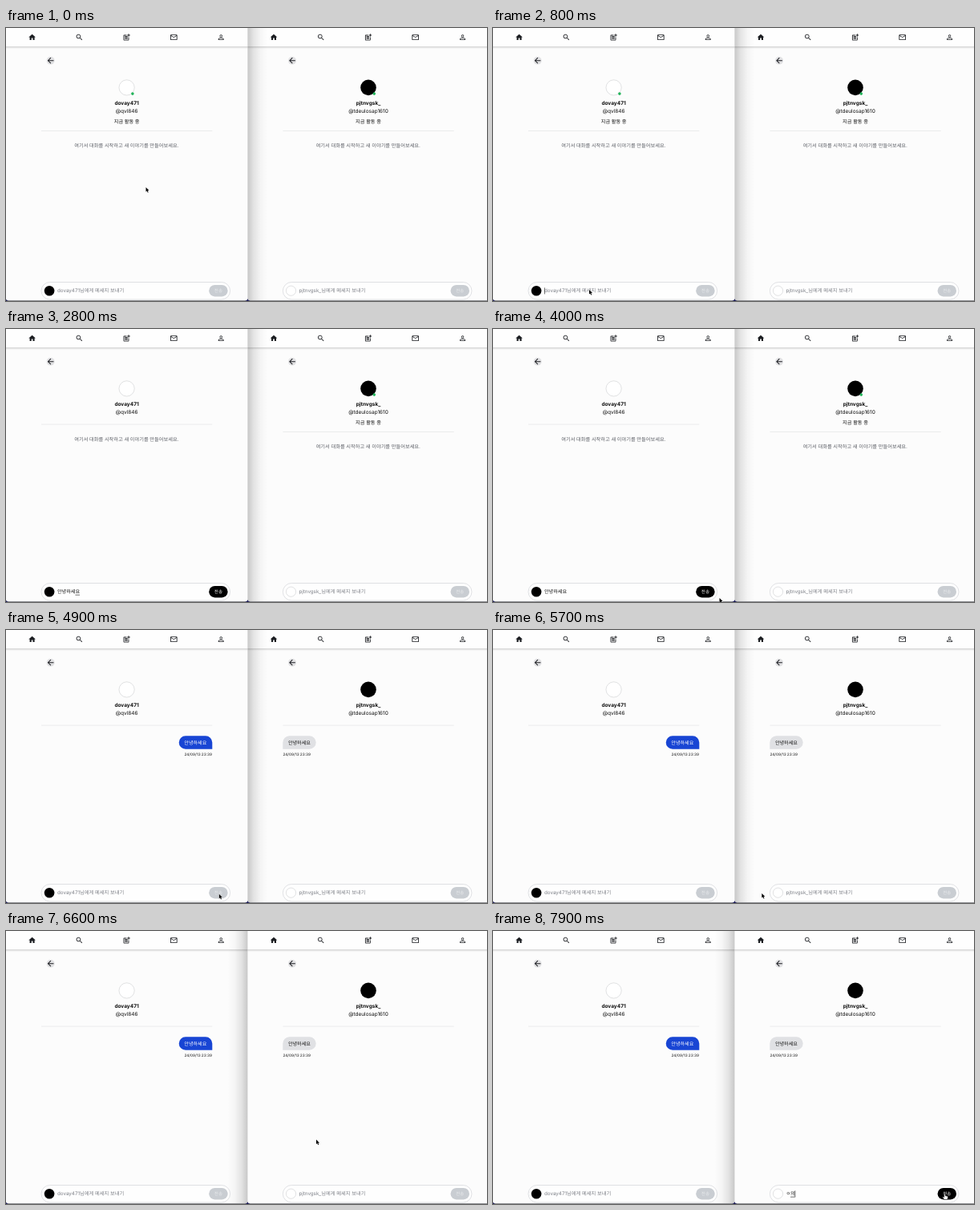
These frames come from a looping animation (600x341 px, 8000 ms). An HTML page:

```html
<!DOCTYPE html>
<html lang="ko">
<head>
<meta charset="utf-8">
<style>
html, body { margin: 0; width: 100%; height: 100%; overflow: hidden; background: #fcfcfc; }
svg { display: block; width: 100vw; height: 100vh; }
text { font-family: Inter, 'Noto Sans CJK KR', 'Noto Sans CJK JP', sans-serif; font-size: 6.2px; font-weight: 500; fill: #111; text-rendering: geometricPrecision; }
.mid { text-anchor: middle; }
.end { text-anchor: end; }
.name { font-size: 6.5px; font-weight: 700; }
.id { font-size: 6.5px; font-weight: 400; }
.hint { fill: #5c5f66; font-size: 6.23px; }
.place { fill: #7c7f86; font-size: 6.25px; font-weight: 400; }
.typed, .msg { font-size: 6.1px; }
.send { font-size: 5.5px; }
.time { font-size: 4.7px; fill: #333; }
</style>
</head>
<body>
<svg id="stage" viewBox="0 0 600 341" preserveAspectRatio="none">
  <defs>
    <linearGradient id="fade">
      <stop offset="0" stop-opacity=".21"/>
      <stop offset=".3" stop-opacity=".1"/>
      <stop offset=".65" stop-opacity=".03"/>
      <stop offset="1" stop-opacity="0"/>
    </linearGradient>
    <linearGradient id="drop" x2="0" y2="1">
      <stop offset="0" stop-opacity=".17"/>
      <stop offset="1" stop-opacity="0"/>
    </linearGradient>
  </defs>
</svg>
<script>
const LOOP = 8000, STEP = 100, SEAM = 301.4;
const stage = document.getElementById('stage');

function add(parent, tag, attrs = {}, text) {
  const el = document.createElementNS('http://www.w3.org/2000/svg', tag);
  for (const key in attrs) el.setAttribute(key, attrs[key]);
  if (text) el.textContent = text;
  parent.append(el);
  return el;
}
const show = (el, on) => el.setAttribute('visibility', on ? 'visible' : 'hidden');
const within = (t, spans) => spans.some(([a, b]) => t >= a && t < b);

const ICONS = [
  'M10 20v-6h4v6h5v-8h3L12 3 2 12h3v8z',
  'M15.5 14h-.8l-.3-.3A6.5 6.5 0 1 0 13.7 14.4l.3.3v.8l5 5 1.5-1.5zm-6 0a4.5 4.5 0 1 1 0-9 4.5 4.5 0 0 1 0 9z',
  'M17 19.2H5V7h7V5H5a2 2 0 0 0-2 2v12a2 2 0 0 0 2 2h12a2 2 0 0 0 2-2v-7h-2zM19 2h-2v3h-3v2h3v3h2V7h3V5h-3zM7 9h8v2H7zM7 12h8v2H7zM7 15h8v2H7z',
  'M22 6a2 2 0 0 0-2-2H4a2 2 0 0 0-2 2v12a2 2 0 0 0 2 2h16a2 2 0 0 0 2-2zm-2 0-8 5-8-5zm0 12H4V8l8 5 8-5z',
  'M12 5.9a2.1 2.1 0 1 1 0 4.2 2.1 2.1 0 0 1 0-4.2m0 9c3 0 6.1 1.5 6.1 2.1v1.1H5.9V17c0-.6 3.1-2.1 6.1-2.1M12 4a4 4 0 1 0 0 8 4 4 0 0 0 0-8zm0 9c-2.7 0-8 1.3-8 4v3h16v-3c0-2.7-5.3-4-8-4z'
];
const BACK = 'M20 11H7.8l5.6-5.6L12 4l-8 8 8 8 1.4-1.4L7.8 13H20z';

function icon(g, d, x, y, s) {
  add(g, 'path', { d, fill: '#1c1e22', 'fill-rule': 'evenodd', transform: `translate(${x} ${y}) scale(${s}) translate(-12 -12)` });
}

function avatar(g, cx, cy, r, dark) {
  add(g, 'circle', dark ? { cx, cy, r } : { cx, cy, r: r - .2, fill: '#fff', stroke: '#b4b5b8', 'stroke-width': .4 });
}

function chatWindow(x, name, id, mine) {
  const g = add(stage, 'g', { transform: `translate(${x} 0)` });
  add(g, 'rect', { width: SEAM, height: 341, fill: '#fcfcfc' });
  add(g, 'rect', { width: SEAM, height: 23, fill: '#fefefe' });
  add(g, 'rect', { y: 23, width: SEAM, height: 3, fill: 'url(#drop)' });
  ICONS.forEach((d, i) => icon(g, d, 32.6 + 58.9 * i, 11.6, .43));
  add(g, 'circle', { cx: 55.6, cy: 40.7, r: 5, fill: '#e2e2e4' });
  icon(g, BACK, 55.6, 40.7, .48);

  avatar(g, 150.6, 74.4, 9.8, !mine);
  const dot = add(g, 'circle', { cx: 157.9, cy: 82.1, r: 1.8, fill: '#22b45a' });
  add(g, 'text', { class: 'mid name', x: 150.6, y: 96.4 }, name);
  add(g, 'text', { class: 'mid id', x: 150.6, y: 106.2 }, id);
  const status = add(g, 'text', { class: 'mid', x: 150.6, y: 119.2 }, '지금 활동 중');
  const body = add(g, 'g');
  add(body, 'path', { d: 'M44 128.5H257.3', stroke: '#e6e7e9', 'stroke-width': .8 });
  const hint = add(body, 'text', { class: 'mid hint', x: 150.4, y: 149.2 }, '여기서 대화를 시작하고 새 이야기를 만들어보세요.');

  const chat = add(g, 'g');
  add(chat, 'path', mine
    ? { d: 'M224 132.2h25a8.3 8.3 0 0 1 8.3 8.3v8.3h-33.3a8.3 8.3 0 0 1 0-16.6z', fill: '#1845d4' }
    : { d: 'M52 132.2h25a8.3 8.3 0 0 1 0 16.6H43.9v-8.3a8.3 8.3 0 0 1 8.1-8.3z', fill: '#e0e1e4' });
  add(chat, 'text', { class: 'mid msg', x: mine ? 236.3 : 64.5, y: 142.7, style: mine ? 'fill:#fff' : '' }, '안녕하세요');
  add(chat, 'text', { class: mine ? 'end time' : 'time', x: mine ? 257 : 44, y: 157 }, '24/09/13 23:39');

  add(g, 'rect', { x: 44, y: 317.5, width: 235.6, height: 21.6, rx: 10.8, fill: '#fefefe', stroke: '#d9dade', 'stroke-width': .8 });
  avatar(g, 54.1, 328.2, 6.3, mine);
  const place = add(g, 'text', { class: 'place', x: 64, y: 330.4 }, name + '님에게 메세지 보내기');
  const typed = add(g, 'text', { class: 'typed', x: 64, y: 330.4 });
  const line = add(g, 'path', { stroke: '#111', 'stroke-width': .6 });
  const caret = add(g, 'rect', { y: 324.4, width: .6, height: 8, fill: '#111' });
  const button = add(g, 'rect', { x: 253.2, y: 320.9, width: 23.4, height: 14.6, rx: 7.3 });
  const label = add(g, 'text', { class: 'mid send', x: 264.9, y: 330.2 }, '전송');

  return s => {
    show(dot, s.active);
    show(status, s.active);
    body.setAttribute('transform', `translate(0 ${s.active ? 0 : -9.4})`);
    show(hint, !s.sent);
    show(chat, s.sent);
    show(place, !s.text);
    typed.textContent = s.text;
    const w = s.text ? typed.getComputedTextLength() : 0;
    show(line, s.text && s.composing);
    line.setAttribute('d', `M${64 + w * (1 - 1 / (s.text.length || 1))} 332.2H${64 + w}`);
    caret.setAttribute('x', 64 + w);
    show(caret, s.caret);
    button.setAttribute('fill', s.text ? '#000' : '#c9cdd2');
    label.style.fill = s.text ? '#fff' : '#e9ebed';
  };
}

const drawLeft = chatWindow(0, 'dovay471', '@qvl846', true);
const drawRight = chatWindow(SEAM, 'pjtnvgsk_', '@tdeulosap1610', false);

const shadeRight = add(stage, 'rect', { width: 25, height: 341, fill: 'url(#fade)', transform: `translate(${SEAM} 0)` });
const shadeLeft = add(stage, 'rect', { width: 25, height: 341, fill: 'url(#fade)', transform: `translate(${SEAM} 0) scale(-1 1)` });
add(stage, 'rect', { y: 340.2, width: 600, height: .8, fill: '#77787e' });
add(stage, 'path', { d: `M0 338.6Q.4 340.4 3 341H0zM${SEAM} 338.2Q301 340.4 298.2 341H304.6Q301.8 340.4 ${SEAM} 338.2z`, fill: '#1c1c58' });

const arrow = add(stage, 'path', { d: 'M0 0V5.6L1.3 4.5 2.2 6.6 3.2 6.2 2.3 4.1H4z', stroke: '#fff', 'stroke-width': .8, 'paint-order': 'stroke' });
const hand = add(stage, 'path', { d: 'M-.8 .4Q0-.4 .7 .4V2.7L3.4 3.3Q4.3 3.6 4 4.8L3.3 7.4H-.6L-2.7 4.6Q-2.6 3.5-1.5 4.1L-.8 4.6z', fill: '#fff', stroke: '#000', 'stroke-width': .5 });

// time, x, y of the pointer tip
const PATH = [
  [0, 174.5, 199], [800, 120, 327], [3400, 120, 327], [3700, 190, 288.5], [4000, 282.5, 336],
  [4300, 265.8, 329.8], [5300, 265.8, 329.8], [6000, 380.4, 328.5], [6200, 380.4, 328.5],
  [6600, 387, 260.6], [7100, 563.5, 328], [LOOP, 563.5, 328]
];
function pointer(t) {
  const i = Math.max(1, PATH.findIndex(p => p[0] >= t));
  const [a, b] = [PATH[i - 1], PATH[i]];
  const u = (t - a[0]) / (b[0] - a[0]), k = u * u * (3 - 2 * u);
  return [a[1] + (b[1] - a[1]) * k, a[2] + (b[2] - a[2]) * k];
}

const TYPE_LEFT = [[1000, 'ㅇ'], [1200, '아'], [1500, '애'], [1900, '아'], [2000, '안'], [2100, '안녀'], [2200, '안녕'],
  [2300, '안녕하'], [2400, '안녕하세'], [2500, '안녕하세요'], [4600, '']];
const TYPE_RIGHT = [[7300, 'ㅇ'], [7500, 'ㅇㅇ'], [7700, 'ㅇ으'], [7800, 'ㅇ의']];
const typedAt = (list, t) => list.reduce((s, [at, text]) => t >= at ? text : s, '');

function render(t) {
  const left = typedAt(TYPE_LEFT, t), right = typedAt(TYPE_RIGHT, t);
  drawLeft({
    active: t < 1300, sent: t >= 4900, text: left, composing: t < 3000,
    caret: within(t, [[700, 2800], [3000, 3300], [3600, 3900], [4200, 4600]])
  });
  drawRight({
    active: t < 4600, sent: t >= 4700, text: right, composing: true,
    caret: within(t, [[6100, 6500], [6900, LOOP]])
  });
  const focus = Math.min(1, Math.max(0, (t - 5800) / 500));
  shadeRight.setAttribute('opacity', Math.max(0, 1 - focus * 2.5));
  shadeLeft.setAttribute('opacity', focus);

  const [x, y] = pointer(t);
  const seen = !within(t, [[1000, 3500]]);
  const link = within(t, [[4200, 4600], [7300, LOOP]]);
  show(arrow, seen && !link);
  show(hand, seen && link);
  for (const el of [arrow, hand]) el.setAttribute('transform', `translate(${x} ${y})`);
}

const start = performance.now();
function tick() {
  const t = (performance.now() - start) % LOOP;
  render(Math.floor(t / STEP) * STEP);
  requestAnimationFrame(tick);
}
tick();
</script>
</body>
</html>
```
